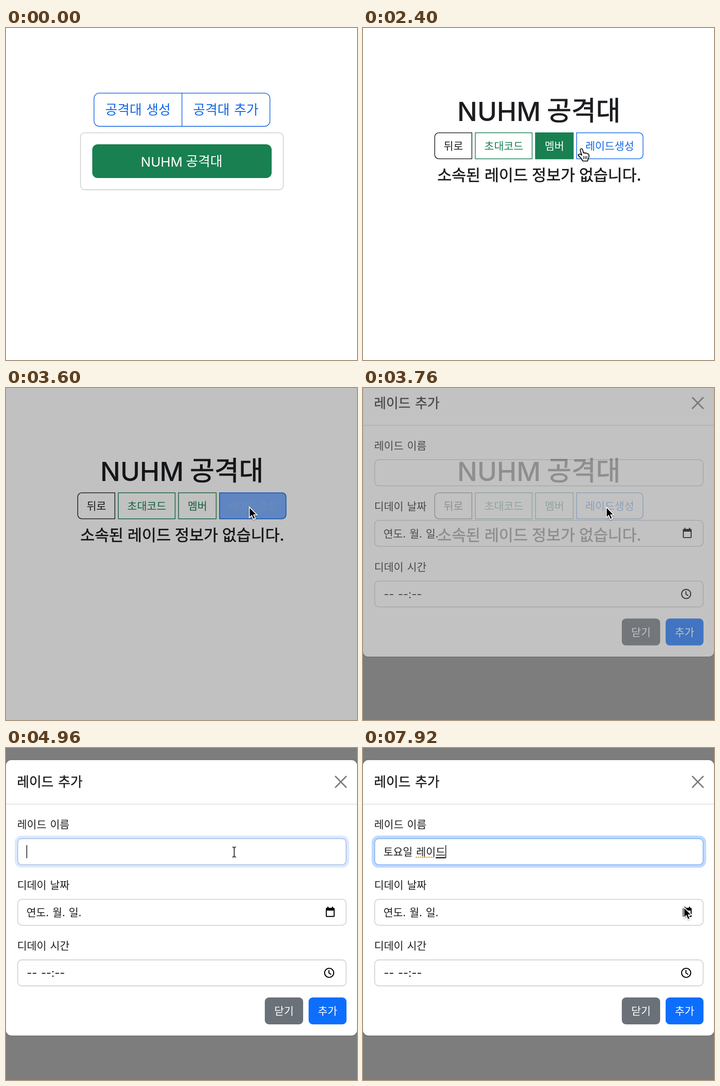
Write an HTML page that moves like this. It is 769 px wide and 728 px high and loops after 8 s.

```html
<!DOCTYPE html>
<html lang="ko">
<head>
<meta charset="utf-8">
<title>레이드 추가</title>
<style>
  html, body { margin: 0; width: 100%; height: 100%; overflow: hidden; background: #fff; }
  svg { display: block; width: 769px; height: 728px; }
  text { font: 23.2px "Noto Sans CJK KR", "Noto Sans CJK JP", sans-serif; word-spacing: .06em; fill: #1b1d20; white-space: pre; }
  .mid { text-anchor: middle; }
  .lg { font-size: 29.1px; }
  .h1 { font-size: 58.4px; }
  .h4 { font-size: 34.3px; word-spacing: -.02em; }
  .medium { stroke: #1b1d20; stroke-width: .018em; }
  .latin { font-family: Inter, "Open Sans", sans-serif; }
  .h1.latin { font-size: 58px; font-weight: 500; }
  .w text, text.w { fill: #fff; }
  text.blue { fill: #1467e6; }
  text.green { fill: #198051; }
  .line { fill: none; stroke-width: 1.55; }
  .line.blue { stroke: #1467e6; }
  .line.green { stroke: #198051; }
  .field { fill: #fff; stroke: #cacbcd; stroke-width: 1.55; }
</style>
</head>
<body>
<svg viewBox="0 0 769 728">
  <g id="home">
    <rect class="line blue" x="192.8" y="142.8" width="385.5" height="72.8" rx="12"/>
    <path class="line blue" d="M385.5 142.8V215.6"/>
    <text class="mid lg blue" x="289" y="190">공격대 생성</text>
    <text class="mid lg blue" x="481.5" y="190">공격대 추가</text>
    <rect class="line" stroke="#cbcbcb" x="163.3" y="229.8" width="444.2" height="124.8" rx="9"/>
    <rect x="189" y="255" width="393" height="74" rx="12" fill="#198051"/>
    <rect id="dark" x="189" y="255" width="393" height="74" rx="12" fill="#156b43"/>
    <text class="mid lg latin w" x="341" y="303.5">NUHM</text>
    <text class="lg w" x="394" y="303">공격대</text>
  </g>

  <g id="raid">
    <text class="mid h1 latin" x="298" y="204">NUHM</text>
    <text class="h1 medium" x="403" y="202.3">공격대</text>
    <path class="line" stroke="#1b1d20" d="M238.5 229.7V286.8H166.2a9 9 0 0 1-9-9V238.7a9 9 0 0 1 9-9Z"/>
    <text class="mid" x="198" y="267">뒤로</text>
    <rect class="line green" x="246" y="229.7" width="124.5" height="57.1"/>
    <text class="mid green" x="308.5" y="267">초대코드</text>
    <rect class="line green" x="378" y="229.7" width="82.5" height="57.1"/>
    <text class="mid green" x="419.3" y="267">멤버</text>
    <g id="member" class="w">
      <rect x="377.3" y="229" width="84" height="58.6" fill="#198051"/>
      <text class="mid" x="419.3" y="267">멤버</text>
    </g>
    <path class="line blue" d="M468 229.7H604.5a9 9 0 0 1 9 9V277.8a9 9 0 0 1-9 9H468Z"/>
    <text class="mid blue" x="540.5" y="267">레이드생성</text>
    <g id="create" class="w">
      <path fill="#0d6efd" stroke="#1467e6" stroke-width="1.55" d="M468 229.7H604.5a9 9 0 0 1 9 9V277.8a9 9 0 0 1-9 9H468Z"/>
      <text class="mid" x="540.5" y="267">레이드생성</text>
    </g>
    <text class="mid h4 medium" x="386" y="335">소속된 레이드 정보가 없습니다.</text>
  </g>

  <rect id="shade" width="769" height="728"/>

  <g id="modal">
    <rect x="-.5" y="26" width="770" height="605" rx="12" fill="#fff" stroke="#000" stroke-opacity=".45" stroke-width="1.2"/>
    <text class="lg medium" x="24" y="85">레이드 추가</text>
    <path d="M722 62.5 745 86M745 62.5 722 86" stroke="#7b7b7b" stroke-width="3.2" stroke-linecap="round"/>
    <path d="M0 123.2H769" stroke="#dbdcde" stroke-width="1.55"/>
    <text x="24.5" y="176">레이드 이름</text>
    <text x="24.5" y="309">디데이 날짜</text>
    <text x="24.5" y="442">디데이 시간</text>

    <rect class="field" x="25.6" y="198.6" width="719.6" height="57.4" rx="9"/>
    <g id="focus" fill="none">
      <rect x="22.1" y="195.1" width="726.6" height="64.4" rx="12" stroke="#c0d9fe" stroke-width="6.2"/>
      <rect x="25.6" y="198.6" width="719.6" height="57.4" rx="9" stroke="#86b4f8" stroke-width="1.6"/>
    </g>
    <text id="name" x="44.7" y="236"></text>
    <path id="dots" d="M117 239.6H157" stroke="#e0a83a" stroke-width="3.4" stroke-linecap="round" stroke-dasharray="0 4.6"/>
    <rect id="under" y="239.4" height="2.5" fill="#111"/>
    <rect id="caret" y="213" width="1.6" height="28.5" fill="#111"/>

    <rect class="field" x="25.6" y="331.7" width="719.6" height="57" rx="9"/>
    <text x="44.7" y="369">연도. 월. 일.</text>
    <path fill-rule="evenodd" d="M704 348h2.5v2.5h7.5V348h2.5v2.5h1.5a2 2 0 0 1 2 2V368.5a2 2 0 0 1-2 2H702.7a2 2 0 0 1-2-2V352.5a2 2 0 0 1 2-2H704ZM702.9 356.5V368.3H717.8V356.5Z"/>
    <rect class="field" x="25.6" y="464.6" width="719.6" height="57" rx="9"/>
    <text class="latin" style="font-size:24.7px" x="45.5" y="502">-- --:--</text>
    <g fill="none" stroke="#000" stroke-width="2.2">
      <circle cx="708" cy="493" r="10"/>
      <path d="M707.5 487V493.5L712.5 496.6"/>
    </g>

    <rect x="567" y="547" width="84" height="59" rx="9" fill="#6b7178"/>
    <text class="mid w" x="609" y="585">닫기</text>
    <rect x="663" y="547" width="83" height="59" rx="9" fill="#0d6efd"/>
    <text class="mid w" x="704.5" y="585">추가</text>
  </g>

  <g id="pointer" style="filter:drop-shadow(0 1.5px 1.5px rgba(0,0,0,.35))">
    <path id="arrow" d="M0 0V23.5L5.3 18.6 9 27 13.2 25.2 9.7 17.2H16.8Z" stroke="#fff" stroke-width="1.8"/>
    <g id="hand" stroke="#000" stroke-width="1.7" stroke-linejoin="round" stroke-linecap="round">
      <path fill="#fff" d="M-1.5 1C-2.8 4 0 8 1.5 14C-1 11.5-5 10.5-6.3 13C-6.5 15-2 18 0 21C1 23 3 24 3.5 26.5H14C14 23 17 21 17 15.5C17 11 14.5 9.5 13 11C12 8.5 9.5 8.5 8.5 10C7.5 8 5.5 8 5 9L3.2 2C2.5-1-.5-1.2-1.5 1Z"/>
      <path fill="none" stroke-width="1.4" d="M5.5 16.5V22M9 16.5V22M12.4 16.5V22"/>
    </g>
    <path id="beam" d="M-4-11Q0-11 0-8Q0-11 4-11M0-8V8M-4 11Q0 11 0 8Q0 11 4 11" fill="none" stroke="#222" stroke-width="1.6"/>
  </g>
</svg>
<script>
const LOOP = 8000, STEP = 80;
const $ = id => document.getElementById(id);
const show = (id, on) => { $(id).style.display = on ? '' : 'none'; };
const fade = (id, v) => { $(id).style.opacity = v; };
const clamp = v => Math.min(1, Math.max(0, v));
const ramp = (t, from, len) => clamp((t - from) / len);
const smooth = k => k * k * (3 - 2 * k);

const PAGE = 1600, LEAVE = 2400, OPEN = 3528, FOCUS = 4880, TYPE = 5560, KEY = 140;

// time, x, y of the pointer tip
const PATH = [
  [80, 404, 728], [400, 412, 560], [640, 424, 400], [800, 430, 312], [880, 433, 280],
  [1040, 435, 250], [1240, 438, 268], [2000, 440, 268], [2240, 446, 267], [2400, 478, 265],
  [2640, 508, 263], [2960, 533, 261], [4400, 533, 261], [4800, 500, 228],
  [7480, 500, 228], [7600, 545, 258], [7840, 703, 349], [8000, 703, 349]
];
// time from which each pointer shape holds
const SHAPES = [
  [0, ''], [160, 'arrow'], [800, 'hand'], [960, 'arrow'], [1120, 'hand'],
  [3520, 'arrow'], [4640, 'beam'], [TYPE, ''], [7440, 'beam'], [7600, 'arrow']
];
const TYPED = ['', 'ㅌ', '토', '통', '토요', '토용', '토요이', '토요일', '토요일 ', '토요일 ㄹ',
  '토요일 레', '토요일 렝', '토요일 레이', '토요일 레읻', '토요일 레이드'];

function place(t) {
  const i = PATH.findIndex(p => p[0] > t);
  if (i < 1) return PATH[i ? PATH.length - 1 : 0].slice(1);
  const [t0, x0, y0] = PATH[i - 1], [t1, x1, y1] = PATH[i];
  const k = smooth((t - t0) / (t1 - t0));
  return [x0 + (x1 - x0) * k, y0 + (y1 - y0) * k];
}

function pointer(t) {
  const [x, y] = place(t);
  $('pointer').setAttribute('transform', `translate(${x} ${y})`);
  const shape = SHAPES.filter(s => s[0] <= t).pop()[1];
  for (const id of ['arrow', 'hand', 'beam']) show(id, id === shape);
}

function typing(t) {
  const n = t < TYPE ? 0 : Math.min(TYPED.length - 1, 1 + Math.floor((t - TYPE) / KEY));
  const word = TYPED[n], name = $('name');
  if (name.textContent !== word) name.textContent = word;
  const end = 44.7 + (word ? name.getComputedTextLength() : 0);
  const composing = word && !word.endsWith(' ');
  $('caret').setAttribute('x', end);
  show('caret', t >= FOCUS);
  show('under', composing);
  $('under').setAttribute('x', end - 21.3);
  $('under').setAttribute('width', 21.3);
  show('dots', t >= TYPE + TYPED.length * KEY);
}

function draw(t) {
  show('home', t < PAGE);
  show('raid', t >= PAGE);
  fade('dark', t < 1000 ? smooth(ramp(t, 800, 150)) : t < 1120 ? .5 : .5 + .5 * ramp(t, 1120, 150));
  fade('member', 1 - smooth(ramp(t, LEAVE, 150)));
  fade('create', smooth(ramp(t, LEAVE, 150)) * (1 - smooth(ramp(t, OPEN, 150))));
  fade('shade', .51 * ramp(t, OPEN, 152));

  const slide = 1 - Math.pow(1 - ramp(t, OPEN + 152, 300), 2);
  fade('modal', ramp(t, OPEN + 152, 150));
  $('modal').setAttribute('transform', `translate(0 ${-77 * (1 - slide)})`);
  fade('focus', smooth(ramp(t, FOCUS, 150)));
  typing(t);
  pointer(t);
}

function tick(now) {
  draw(Math.floor(now % LOOP / STEP) * STEP);
  requestAnimationFrame(tick);
}
draw(0);
requestAnimationFrame(tick);
</script>
</body>
</html>
```
